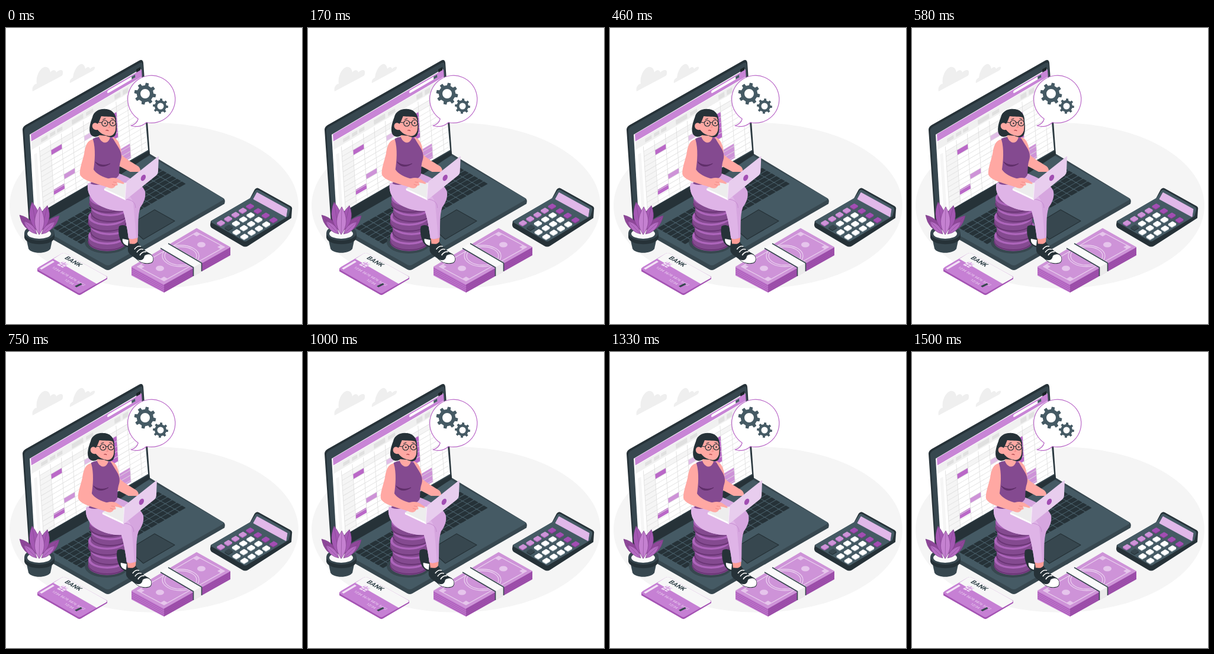
Write an HTML page that moves like this. It is 500x500 px and loops after 1540 ms.

```html
<!DOCTYPE html>
<html lang="en">
<head>
<meta charset="utf-8">
<title>Accounting</title>
<style>
html, body { margin: 0; width: 100%; height: 100%; overflow: hidden; background: #fff; }
svg { display: block; width: 100vw; height: 100vh; }
text { font-family: Roboto, Arial, sans-serif; }
</style>
</head>
<body>
<svg viewBox="0 0 500 500" xmlns="http://www.w3.org/2000/svg">
  <ellipse cx="250" cy="300" rx="244" ry="140" fill="#f5f5f5"/>
  <g fill="#efefef">
    <path d="M45 107C43 101 47 95 52 94C50 82 57 68 65 66C71 65 74 69 75 75C78 70 84 70 85 75C90 70 97 69 96 76C96 79 95 81 92 82Z"/>
    <path d="M108 93C107 88 110 85 113 84C114 74 120 63 126 61C131 60 133 64 134 69C137 65 141 65 142 69C146 65 151 64 150 68C149 71 147 72 145 73Z"/>
  </g>

  <!-- big laptop -->
  <path d="M40 322L242 212L368 288Q371 291 369 297L176 408Q172 410 168 408L42 336Z" fill="#37474f"/>
  <path d="M42 326L242 216L366 287Q369 289 366 291L176 400Q172 402 168 400L42 329Z" fill="#455a64"/>
  <path d="M28 172Q28 167 33 164L225 55Q231 52 232 59L243 214L42 328Q38 326 38 318Z" fill="#263238"/>
  <path d="M31 174Q31 170 35 167L226 59Q231 57 231 62L241 211L45 321Q41 320 40 316Z" fill="#37474f"/>
  <path d="M44 320L242 207L243 214L140 284L46 338Z" fill="#263238"/>
  <path d="M40 180L228 69L240 206L48 317Z" fill="#fff"/>
  <path d="M220 70L227 66L228 78L221 82Z" fill="#1a2327"/>
  <g id="sheet" transform="matrix(1 -.585 .065 1 42 179.500)">
    <path d="M0 0H187V12H0Z" fill="#c885d6"/>
    <path d="M131 4.500H174" stroke="#fff" stroke-width="4.500" stroke-linecap="round"/>
    <path d="M170 4.500H176" stroke="#455a64" stroke-width="4.500"/>
    <path d="M0 13H187V26H0Z" fill="#f0f0f0"/>
    <path d="M16 17H27V23H16ZM31 17H40V23H31ZM43 17H52V23H43ZM68 16H87V24H68ZM92 17H104V23H92ZM140 16H150V24H140ZM154 16H163V24H154Z" fill="#e0e0e0"/>
    <path d="M12.500 36.500H187V45H12.500ZM3 36H8V136H3ZM12.500 45H31V136H12.500Z" fill="#f5f5f5"/>
  </g>
  <g id="keys" fill="#263238" transform="matrix(1 -.575 1 .575 80 338)"/>
  <path d="M206 334L251 307L285 326L232 357Z" fill="#37474f" stroke="#263238" stroke-width="1.300" stroke-linejoin="round"/>

  <!-- bubble -->
  <path d="M223.200 153.500A40.100 40.100 0 1 1 237.200 159.500C231 166 220 168 211 165C218 163 222 159 223.200 153.500Z" fill="#fff" stroke="#ba68c8" stroke-width="1.200" stroke-linejoin="round"/>
  <g id="gears" fill="#455a64" fill-rule="evenodd"/>

  <ellipse cx="170" cy="362" rx="37" ry="19" fill="#37474f"/>
  <g id="coins"/>

  <!-- plant -->
  <g id="plant">
    <path d="M34 354L38 373C43 382 69 382 75 373L79 354Z" fill="#37474f"/>
    <path d="M31 346V354C34 369 79 369 82 354V346Z" fill="#263238"/>
    <ellipse cx="56.500" cy="346" rx="25.500" ry="13" fill="#37474f"/>
    <ellipse cx="56" cy="347.500" rx="20" ry="8.500" fill="#fafafa"/>
  </g>

  <!-- bank card -->
  <path d="M53 406L97 380L171 420V424L127 450Q124 452 121 450L53 411Z" fill="#a453b3"/>
  <path d="M55 404L94 381Q98 379 101 381L169 419Q172 421 169 423L127 447Q124 449 121 447L55 409Q52 407 55 404Z" fill="#c680d4"/>
  <path d="M80 390L94 381Q98 379 101 381L169 419Q172 421 169 423L153 432Z" fill="#f7f7f7"/>
  <path d="M57 406L79 393L82 395L60 408Z" fill="#f3e2f6"/>
  <g transform="matrix(.87 .5 -.87 .5 98 389)">
    <text font-size="11" font-weight="700" fill="#37474f">BANK</text>
  </g>
  <path d="M86 400L96 394L106 399L96 405Z" fill="#f0dcf4"/>
  <path d="M89 398L99 404M93 396L102 401M91 403L101 396" stroke="#c680d4" stroke-width="1"/>
  <g fill="#f3e2f6" font-size="6">
    <text transform="matrix(.87 .5 -.87 .5 77 405)" letter-spacing=".2">1234 5678 9876 5432</text>
    <text transform="matrix(.87 .5 -.87 .5 98 426)">12/34</text>
  </g>
  <path d="M116 436L126 431L129 433L119 438Z" fill="#37474f"/>

  <!-- banknotes -->
  <path d="M212 403L267 433V447L212 418Z" fill="#c074ce"/>
  <path d="M267 433L379 370V384L267 447Z" fill="#a050ae"/>
  <path id="pages" fill="none" stroke="#8e4799" stroke-width=".6"/>
  <path d="M212 403L322 338L379 370L267 433Z" fill="#ce93d8"/>
  <g fill="none" stroke="#e9cfee" stroke-width="1.300">
    <path d="M222 403L322 345L369 370L267 427Z"/>
    <ellipse cx="295" cy="385" rx="31" ry="18"/>
    <ellipse cx="295" cy="385" rx="27" ry="15.500"/>
  </g>
  <g fill="#e6c5ec">
    <ellipse cx="260" cy="406" rx="7" ry="4.500"/>
    <ellipse cx="330" cy="366" rx="7" ry="4.500"/>
    <path d="M222 403l6-3.500 6 3.500-6 3.500zM322 345l6 3.500-6 3.500-6-3.500zM369 370l-6 3.500-6-3.500 6-3.500zM267 427l-6-3.500 6-3.500 6 3.500z"/>
  </g>
  <path d="M260 371L274 363L331 396V411L317 419V404Z" fill="#fafafa"/>
  <path d="M317 404L331 396V411L317 419Z" fill="#ebebeb"/>
  <path d="M261 372L316.500 404.500V419M274 364L330.500 397V411" fill="none" stroke="#37474f" stroke-width="1.600"/>

  <!-- calculator -->
  <path d="M346 326L412 288L420 273Q423 269 427 271L481 301Q484 303 483 307L482 321L409 368Q404 371 399 368L348 338Q345 336 345 332Z" fill="#263238"/>
  <path d="M348 325L413 287L421 275Q423 272 427 274L479 303Q481 305 480 308L477 318L408 359Q404 362 400 359L348 329Q345 327 348 325Z" fill="#455a64"/>
  <path d="M424 278L475 306L473 319L418 289Z" fill="#e1b8e9" stroke="#e1b8e9" stroke-linejoin="round"/>
  <g id="buttons"/>

  <!-- woman -->
  <g id="woman">
    <path d="M191 335C196 331 204 333 208 340L211 371C204 371 198 367 195 362C191 354 189 344 191 335Z" fill="#263238"/>
    <path d="M197 356C196 361 199 366 206 368L207 358Z" fill="#fff"/>
    <path d="M180 184C190 187 194 198 195 214C203 222 217 229 224 234C227 237 228 241 226 243L210 243L189 232Z" fill="#ffa8a3"/>
    <path d="M207 350L223 349L222 363L217 368L209 365Z" fill="#ff9d96"/>
    <path d="M152 258L192 246C212 254 232 265 235 276C237 287 232 296 227 303C222 317 224 336 223 354C217 357 211 357 207 355C205 339 202 322 198 309C180 310 152 302 143 285C138 277 137 268 139 262Z" fill="#d6a6df"/>
    <path d="M139 262C155 262 170 262 183 267C202 274 212 284 215 295C217 316 219 338 220 354C215 357 210 357 207 355C205 339 202 322 198 309C180 310 152 302 143 285C138 277 137 268 139 262Z" fill="#dfb4e7"/>
    <path d="M202 289C212 290 219 294 219 304" fill="none" stroke="#c58bd0"/>
    <path d="M157 176L174 178L178 192C172 200 161 198 156 188Z" fill="#ffa8a3"/>
    <path d="M147 187C151 185 154 184 157 184C161 195 172 198 176 185L181 187C185 194 188 198 192 205C195 211 196 217 194 223C191 232 192 240 191 248C185 260 156 269 143 263C149 252 147 235 144 222C142 208 143 196 147 187Z" fill="#844a90"/>
    <path d="M151 226C156 235 166 236 176 229C168 233 157 232 151 226Z" fill="#5f2e69" stroke="#5f2e69"/>
    <path d="M147 188C137 190 134 199 132 213C129 226 124 238 125 247C128 258 154 263 172 269L176 255C163 252 152 246 148 239C150 226 152 204 147 188Z" fill="#ffa8a3"/>

    <path d="M166 271L186 259L205 262L202 290Z" fill="#ededed"/>
    <path d="M166 271L202 288V291L166 274Z" fill="#fff"/>
    <path d="M204 259L257 217Q259 216 258 219L257 243Q257 246 254 249L204 289Q201 291 201 288L203 262Z" fill="#e8cdee"/>
    <path d="M203 261L201 289" stroke="#f7ebf9" stroke-width="1.200"/>
    <ellipse cx="232" cy="253" rx="3.700" ry="5.600" transform="rotate(28 232 253)" fill="#a24eb3"/>
    <path d="M168 257C175 252 185 252 190 255L199 261C201 264 198 264 193 262L187 261C190 264 189 267 185 266C184 270 179 272 174 270L167 267Z" fill="#ffa8a3"/>
    <path d="M187 261L181 260M185 266L179 264" stroke="#ea7d79" stroke-width=".7"/>

    <path d="M146 151C148 141 158 136 168 137C180 137 187 147 186 157C188 168 187 178 184 182C179 187 174 184 169 182L158 181C153 186 144 184 142 177C140 171 142 161 146 151Z" fill="#263238"/>
    <path d="M155 162C158 158 159 153 161 149C168 150 178 149 183 151C186 157 186 166 185 173C183 180 178 184 172 182C164 181 158 176 155 172C149 173 145 169 146 164C147 160 151 159 155 162Z" fill="#ffa8a3"/>
    <g fill="none" stroke="#263238" stroke-width="1.200" stroke-linecap="round">
      <circle cx="167" cy="161" r="5"/>
      <circle cx="180.500" cy="160.500" r="5"/>
      <path d="M172 160Q173.500 159 175.500 160M162 160L155 159M164 154.500L168 153M178 153L182 154"/>
      <path d="M169 173Q171 172 173 173.500" stroke="#a83f45"/>
      <path d="M174 163L175.500 168H173" stroke="#ea7d79" stroke-width=".8"/>
    </g>
    <circle cx="167.500" cy="161" r="1.300" fill="#263238"/>
    <circle cx="180.500" cy="160.500" r="1.300" fill="#263238"/>

    <path d="M206 367C210 361 217 369 222 361C228 371 237 378 245 382C250 386 251 394 246 397C239 400 228 398 221 391C216 386 207 383 206 376Z" fill="#263238"/>
    <path d="M234 385C238 381 246 381 248 387C250 394 246 397 241 397C234 398 227 396 222 391C229 394 233 391 234 385Z" fill="#fff"/>
    <path d="M217 374Q222 367 228 369M221 379Q226 372 232 374M226 384Q230 377 237 378" fill="none" stroke="#fff" stroke-width="1.600"/>
  </g>
</svg>
<script>
const NS = 'http://www.w3.org/2000/svg';
const $ = id => document.getElementById(id);

function add(parent, tag, attrs) {
  const el = document.createElementNS(NS, tag);
  for (const k in attrs) el.setAttribute(k, attrs[k]);
  return parent.appendChild(el);
}

function buildSheet() {
  const g = $('sheet'), col = 18.5, row = 8.6, u0 = 12.5, v0 = 45;
  const cell = (c, r, fill, h = 1) =>
    add(g, 'rect', { x: u0 + c * col, y: v0 + r * row, width: col, height: h * row, fill });
  cell(1, 0, '#ba68c8');
  cell(2, 6, '#ce93d8');
  cell(1, 7.8, '#ba68c8');
  cell(4, 1, '#e1bee7');
  cell(6, 0, '#ba68c8', 5);
  cell(7, 7.5, '#ce93d8', 2.8);
  let d = '';
  for (let c = 0; c < 10; c++) d += `M${u0 + c * col} 28V136`;
  for (let r = -1; r < 11; r++) d += `M${u0} ${v0 + r * row}H187`;
  add(g, 'path', { d, stroke: '#dedede', 'stroke-width': .8, fill: 'none' });
}

function buildKeys() {
  const cols = 15, w = 178 / cols, h = 8;
  for (let r = 0; r < 6; r++)
    for (let c = 0; c < cols; c++)
      add($('keys'), 'rect', { x: c * w, y: r * h, width: w - 1.1, height: h - 1.1, rx: 1 });
}

function gear(x, y, R, hole, teeth, turn) {
  const pts = [], step = 2 * Math.PI / teeth, root = R * .77;
  for (let i = 0; i < teeth; i++)
    for (const [f, r] of [[-.27, root], [-.18, R], [.18, R], [.27, root]]) {
      const a = turn + (i + f) * step;
      pts.push((x + r * Math.cos(a)).toFixed(2) + ' ' + (y + r * Math.sin(a)).toFixed(2));
    }
  const d = `M${pts.join('L')}ZM${x - hole} ${y}a${hole} ${hole} 0 1 0 ${2 * hole} 0a${hole} ${hole} 0 1 0 ${-2 * hole} 0Z`;
  add($('gears'), 'path', { d });
}

function coin(x, y) {
  const g = $('coins'), rx = 32, ry = 15;
  add(g, 'path', { d: `M${x - rx} ${y}v11a${rx} ${ry} 0 0 0 ${2 * rx} 0v-11Z`, fill: '#844a90' });
  add(g, 'path', { d: `M${x - rx} ${y + 9}a${rx} ${ry} 0 0 0 ${2 * rx} 0`, fill: 'none', stroke: '#6a3575', 'stroke-width': 2 });
  add(g, 'ellipse', { cx: x, cy: y, rx, ry, fill: '#ad65bb' });
  add(g, 'ellipse', { cx: x, cy: y - .5, rx: rx - 4, ry: ry - 3, fill: '#844a90' });
}

function leaf(tx, ty, bx, by, w, fill) {
  const len = Math.hypot(tx - bx, ty - by), nx = -(ty - by) / len * w, ny = (tx - bx) / len * w;
  const mx = bx + (tx - bx) * .45, my = by + (ty - by) * .45;
  add($('plant'), 'path', {
    d: `M${bx} ${by}Q${mx + nx * 2} ${my + ny * 2} ${tx} ${ty}Q${mx - nx * 2} ${my - ny * 2} ${bx} ${by}Z`,
    fill, stroke: '#7b3f87', 'stroke-width': .6
  });
  add($('plant'), 'path', { d: `M${bx} ${by}L${tx} ${ty}`, stroke: '#7b3f87', 'stroke-width': .5 });
}

function buildButtons() {
  for (let b = 0; b < 4; b++)
    for (let a = 4; a >= 0; a--) {
      const x = 363 + a * 12.3 + b * 13.2, y = 328.8 - a * 7 + b * 7.7;
      const dark = a === 0 && b === 1;
      const [top, side] = a === 4 ? ['#a24eb3', '#7b3f87'] : dark ? ['#37474f', '#263238']
        : b === 0 ? ['#ce93d8', '#a865b5'] : ['#fff', '#cfd8dc'];
      for (const [dy, fill] of [[1.4, side], [0, top]])
        add($('buttons'), 'path', {
          d: `M${x - 5.5} ${y + .6 + dy}l6-3.600 5 3-6 3.600z`, fill,
          stroke: fill, 'stroke-width': 2.6, 'stroke-linejoin': 'round'
        });
    }
}

buildSheet();
buildKeys();
gear(235, 111, 18.5, 8, 8, .2);
gear(261, 132, 13, 5.5, 8, .1);
[[171, 351], [175, 335], [171, 319], [176, 303], [173, 287]].forEach(p => coin(...p));
leaf(23, 316, 50, 345, 7, '#8e4799');
leaf(90, 317, 62, 345, 7, '#8e4799');
leaf(44, 294, 52, 342, 8, '#a458b3');
leaf(70, 300, 60, 342, 8, '#a458b3');
leaf(30, 326, 52, 348, 5, '#b56cc3');
leaf(83, 327, 60, 348, 5, '#b56cc3');
leaf(57, 302, 56, 349, 8, '#c581d1');
buildButtons();
$('pages').setAttribute('d', [3, 6, 9, 12].map(h => `M212 ${403 + h}L267 ${433 + h}L379 ${370 + h}`).join(''));

// Sideways shake in ten linear steps, shown at 24 pictures a second.
const LOOP = 1540, SPAN = 1500, TICK = 1000 / 24, LEAD = 16;
const SHAKE = [0, -1, 2, -4, 4, -4, 4, -4, 2, -1, 0];

function shift(t) {
  const shown = Math.floor((t + 5) / TICK) * TICK + LEAD;
  const k = shown % SPAN / SPAN * 10, i = Math.floor(k);
  return SHAKE[i] + (SHAKE[i + 1] - SHAKE[i]) * (k - i);
}

let start;
function draw(now) {
  if (start === undefined) start = now;
  const t = (now - start) % LOOP;
  $('woman').setAttribute('transform', `translate(${shift(t).toFixed(3)} 0)`);
  requestAnimationFrame(draw);
}
requestAnimationFrame(draw);
</script>
</body>
</html>
```
